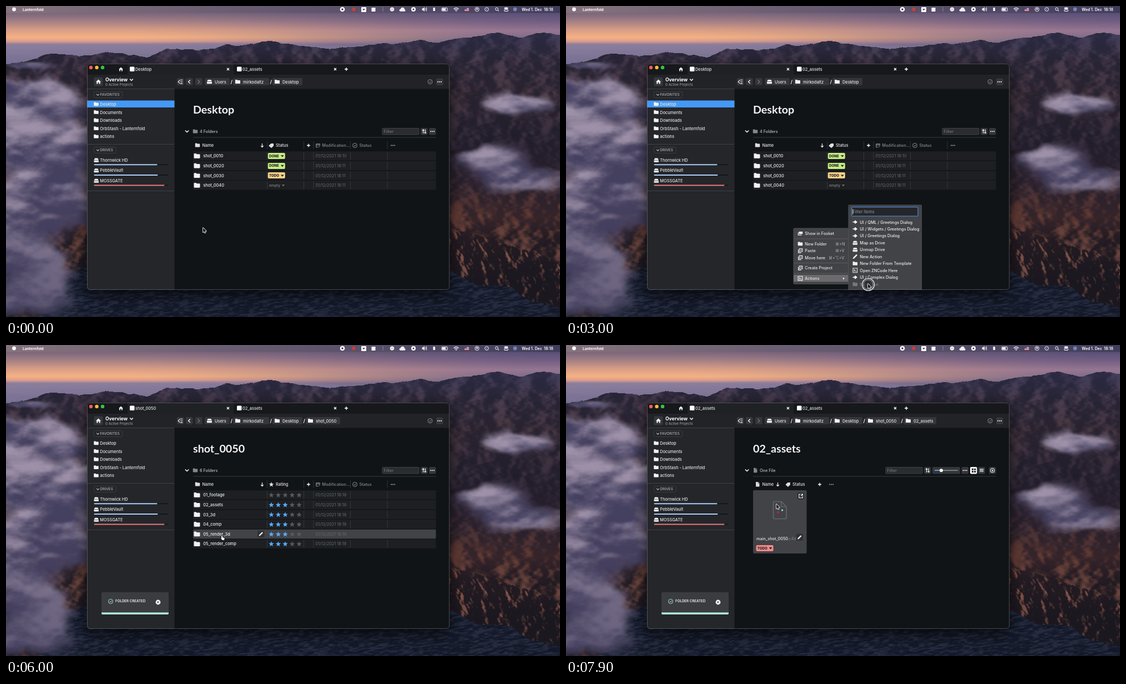
An HTML page with a canvas for the animation above (8 s loop, 998 by 561 pixels).

```html
<!DOCTYPE html>
<html lang="en">
<head>
<meta charset="utf-8">
<title>Folder template demo</title>
<style>
html, body { margin: 0; width: 100%; height: 100%; overflow: hidden; background: #1b1f33; }
canvas { display: block; }
</style>
</head>
<body>
<canvas id="stage" width="998" height="561"></canvas>
<script>
const W = 998, H = 561, LOOP = 8000;
const ctx = document.getElementById('stage').getContext('2d');
const clamp = (v, a = 0, b = 1) => Math.min(b, Math.max(a, v));
const smooth = (a, b, v) => { const t = clamp((v - a) / (b - a)); return t * t * (3 - 2 * t); };

// ---------- landscape ----------
function paintLandscape() {
  const canvas = document.createElement('canvas');
  canvas.width = W; canvas.height = H;
  const g = canvas.getContext('2d'), image = g.createImageData(W, H);
  let seed = 7;
  const lattice = Float32Array.from({ length: 65536 }, () => (seed = (seed * 16807) % 2147483647) / 2147483647);
  const at = (x, y) => lattice[(x & 255) + ((y & 255) << 8)];
  const noise = (x, y) => {
    const i = Math.floor(x), j = Math.floor(y), u = x - i, v = y - j;
    const s = u * u * (3 - 2 * u), r = v * v * (3 - 2 * v);
    const top = at(i, j) + (at(i + 1, j) - at(i, j)) * s;
    return top + (at(i, j + 1) + (at(i + 1, j + 1) - at(i, j + 1)) * s - top) * r;
  };
  const fbm = (x, y, octaves = 4) => {
    let sum = 0, amp = .5, total = 0;
    for (; octaves--; amp /= 2, x = x * 2 + 17, y = y * 2 + 31) { sum += amp * noise(x, y); total += amp; }
    return sum / total;
  };
  const rgb = h => [1, 3, 5].map(i => parseInt(h.slice(i, i + 2), 16));
  const mix = (a, b, t) => [a[0] + (b[0] - a[0]) * t, a[1] + (b[1] - a[1]) * t, a[2] + (b[2] - a[2]) * t];
  const ramp = (stops, v) => {
    let i = 1;
    while (i < stops.length - 1 && stops[i][0] < v) i++;
    const [a, ca] = stops[i - 1], [b, cb] = stops[i], t = clamp((v - a) / (b - a));
    return typeof ca === 'number' ? ca + (cb - ca) * t : mix(ca, cb, t);
  };
  const stops = list => list.map(([v, c]) => [v, rgb(c)]);

  const sky = stops([[10, '#75627a'], [26, '#a07d84'], [42, '#d69c85'], [56, '#f4b283'], [63, '#dc9d8c'], [69, '#8c7c9a'], [110, '#67648a']]);
  const coolSky = stops([[10, '#554d74'], [28, '#735f83'], [44, '#957591'], [60, '#776887'], [80, '#5a5579']]);
  const land = stops([[50, '#2b2a42'], [95, '#272435'], [150, '#292330'], [240, '#211d2b'], [330, '#29202c'], [380, '#35242a'], [420, '#231b22'], [500, '#1a171f']]);
  const litLand = stops([[50, '#484463'], [100, '#564456'], [150, '#55404a'], [280, '#392f40'], [370, '#6e4136'], [440, '#865548'], [540, '#563a38']]);
  const cloudDark = rgb('#454161'), cloudLight = rgb('#a396ae'), mist = rgb('#8a81a0');
  const seaDark = rgb('#121827'), seaLight = rgb('#292e43');

  const farRidge = [[0, 66], [180, 69], [300, 66], [480, 64], [600, 70], [998, 80]];
  const ridge = [[0, 106], [50, 96], [80, 86], [130, 88], [200, 84], [255, 92], [290, 78], [345, 80], [400, 70], [470, 64], [520, 70], [580, 77], [660, 72], [735, 62], [780, 65], [850, 53], [885, 47], [930, 55], [970, 49], [998, 53]];
  const coast = [[0, 585], [70, 555], [110, 490], [150, 460], [300, 475], [790, 475], [850, 503], [910, 505], [945, 533], [998, 545]];
  const cliffTop = [[790, 402], [850, 412], [920, 434], [998, 464]];
  // Cloud banks: x, y, radius x, radius y, strength
  const banks = [[20, 165, 150, 42, 1], [60, 245, 160, 80, 1.1], [30, 380, 150, 110, 1], [20, 510, 105, 75, .9], [925, 175, 80, 20, .9], [870, 275, 100, 32, .85], [930, 312, 110, 28, .9], [40, 106, 60, 9, .7]];

  for (let x = 0; x < W; x++) {
    const rough = (fbm(x / 22, 3) - .5) * 8;
    const far = ramp(farRidge, x), top = ramp(ridge, x) + rough, shore = ramp(coast, x) + rough;
    const cliff = x > 790 ? ramp(cliffTop, x) + rough : H;
    for (let y = 0; y < H; y++) {
      let c;
      if (y < top) {
        c = mix(ramp(sky, y), ramp(coolSky, y), smooth(200, 1000, x));
        if (y > far) c = mix(c, mist, fbm(x / 90, y / 5) * .6);
      } else if (y > shore) {
        c = mix(seaDark, seaLight, smooth(.3, .85, fbm(x / 9, (y + x * .12) / 2.5, 3)));
      } else {
        // Slopes catch light on the side facing the sunset.
        const steep = y > cliff, u = (x - y * .5) / (steep ? 15 : 34), v = (y + x * .25) / (steep ? 24 : 26);
        const slope = fbm(u + .22, v + .1) - fbm(u, v);
        const lit = steep ? smooth(.01, .2, slope) : smooth(-.1, .2, slope) * .75;
        c = mix(ramp(land, y), ramp(litLand, y), lit);
      }
      if (y > 70 && (x < 260 || x > 700)) {
        let density = 0;
        for (const [bx, by, rx, ry, s] of banks) {
          const d = ((x - bx) / rx) ** 2 + ((y - by) / ry) ** 2;
          if (d < 4) density += s * Math.exp(-d * 1.3);
        }
        if (density > .03) {
          const u = x / 75 + 9, v = y / 42, puff = fbm(u, v, 5);
          const cover = smooth(.22, .62, density * .75 + (puff - .5) * .9);
          const shade = fbm(x / 95, y / 38 + 40, 3) + (fbm(u + .05, v + .25, 5) - puff) * 1.1;
          const dim = 1 - .55 * smooth(310, 500, y);
          c = mix(c, mix(cloudDark, cloudLight, smooth(.2, .8, shade) * dim), cover * .95);
        }
      }
      const p = (y * W + x) * 4;
      image.data[p] = c[0]; image.data[p + 1] = c[1]; image.data[p + 2] = c[2]; image.data[p + 3] = 255;
    }
  }
  g.putImageData(image, 0, 0);
  return canvas;
}

// ---------- drawing helpers ----------
function text(s, x, y, { size = 7.4, color = '#e6e6e8', weight = 500, family = 'Inter' } = {}) {
  ctx.font = `${weight} ${size}px ${family}, "DejaVu Sans", sans-serif`;
  ctx.fillStyle = color;
  ctx.fillText(s, x, y + size * .36);
}
function rect(x, y, w, h, fill, r = 0, stroke) {
  ctx.beginPath();
  ctx.roundRect(x, y, w, h, r);
  if (fill) { ctx.fillStyle = fill; ctx.fill(); }
  if (stroke) { ctx.strokeStyle = stroke; ctx.lineWidth = 1; ctx.stroke(); }
}
function circle(x, y, r, fill, stroke, width = 1) {
  ctx.beginPath();
  ctx.arc(x, y, r, 0, 7);
  if (fill) { ctx.fillStyle = fill; ctx.fill(); }
  if (stroke) { ctx.strokeStyle = stroke; ctx.lineWidth = width; ctx.stroke(); }
}
// Icons live in a 10 by 10 box centred on the given point.
const star = 'M' + Array.from({ length: 10 }, (_, i) => {
  const r = i % 2 ? 2.3 : 5.2, a = i * Math.PI / 5;
  return `${5 + r * Math.sin(a)} ${5.2 - r * Math.cos(a)}`;
}).join('L') + 'Z';
const icons = Object.fromEntries(Object.entries({
  folder: 'M0 2q0-1 1-1h2.5l1.2 1.2H9q1 0 1 1V8q0 1-1 1H1Q0 9 0 8z',
  drive: 'M2 1h6l2 3.7H0zM0 5.5h10V8.5q0 .8-.8.8H.8Q0 9.3 0 8.5z',
  home: 'M0 5.2 5 .5l5 4.7H8.6v4.3H6.2V6.3H3.8v3.2H1.4V5.2z',
  file: 'M1.5 0H6v3h3v7H1.5zM6.7 0 9 2.3H6.7z',
  tag: 'M0 5 4.5 1H9.5V6L5.5 9.7Q4.7 10.3 4 9.5L0 6z',
  pencil: 'M0 10 .8 7 7 .8Q8 0 9.2 1.2T9.2 3L3 9.2z',
  action: 'M0 4h3L5 1l5 4-5 4-2-3H0z',
  window: 'M2 1h8v5H2zM0 3h1.2v4.5H8V9H0z',
  triangle: 'M0 2.5h10L5 8z',
  arrow: 'M2 1 8 5 2 9z',
  speaker: 'M0 3h2l3-2.5v9L2 7H0zM6.5 2.5h1v5h-1zM8.5 1h1v8h-1z',
  cloud: 'M2 8.5Q0 8.3 0 6.5T2 4.5Q3 1.5 6 2T8.2 5Q10 5 10 6.8T8 8.5z',
  star
}).map(([k, d]) => [k, new Path2D(d)]));
const strokes = Object.fromEntries(Object.entries({
  down: 'M1 3 5 7 9 3', left: 'M7 1 3 5 7 9', right: 'M3 1 7 5 3 9',
  cross: 'M1 1 9 9M9 1 1 9', plus: 'M5 0V10M0 5H10', downArrow: 'M5 0V9M1.5 6 5 9.5 8.5 6',
  collapse: 'M4 1 0 5 4 9M5 1H10M5 5H10M5 9H10', check: 'M2.8 5.2 4.5 7 7.4 3.4',
  sort: 'M3 9.5V1M.8 3 3 .8 5.2 3M7.5.5V9M5.3 7 7.5 9.2 9.7 7', calendar: 'M1 1.5H9V5M1 1.5V9H5M1 4H9M6 9 9.5 6',
  list: 'M0 2H10M0 5H10M0 8H10', prompt: 'M.5.5H9.5V9.5H.5ZM2.5 3 5 5 2.5 7M5.5 7H7.5',
  copy: 'M3 1H9.5V7H3ZM1 3V9.5H7M5 4H8', open: 'M4.5 1H1V9H9V5.5M6 .7H9.3V4M9 1 5 5',
  wifi: 'M0 4Q5-.8 10 4M2 6Q5 3 8 6M4 8Q5 7 6 8', gear: 'M5 0V10M0 5H10M1.5 1.5 8.5 8.5M8.5 1.5 1.5 8.5'
}).map(([k, d]) => [k, new Path2D(d)]));
function icon(name, x, y, size = 9, color = '#f2f2f3', width = 1.1) {
  const k = size / 10;
  ctx.save();
  ctx.translate(x - size / 2, y - size / 2);
  ctx.scale(k, k);
  if (icons[name]) { ctx.fillStyle = color; ctx.fill(icons[name]); }
  else { ctx.strokeStyle = color; ctx.lineWidth = width / k; ctx.stroke(strokes[name]); }
  ctx.restore();
}
const dots = (x, y, color = '#fff') => [-3, 0, 3].forEach(d => circle(x + d, y, 1, color));
function checkMark(x, y, color, r = 4) {
  circle(x, y, r, null, color, .9);
  icon('check', x, y, r * 2, color, 1);
}

// ---------- desktop and window frame ----------
const muted = '#77797d', grey = '#bdbec1', panel = '#35363a';

function menuBar() {
  const tint = ctx.createLinearGradient(0, 0, W, 0);
  tint.addColorStop(0, '#85737d');
  tint.addColorStop(.5, '#64586f');
  tint.addColorStop(1, '#403d5c');
  rect(0, 0, W, 12.5, tint);
  circle(14.5, 6, 3.4, '#fff');
  text('Lanternfold', 30, 6.3, { size: 6.7, weight: 700, color: '#fff' });
  circle(606, 6, 4.3, '#fff'); rect(604.5, 4.5, 3, 3, '#34324b');
  rect(624, 3, 5, 6, '#d63c2e');
  rect(640, 2, 9, 9, '#fff', 1); icon('triangle', 644.5, 6.5, 5, '#34324b');
  rect(658.5, 3, 7, 7, '#fff');
  rect(678.5, 2, 1, 8, '#8b88a0');
  circle(695.5, 6, 2.8, null, '#fff', 1.5); icon('gear', 695.5, 6, 8, '#fff', .8);
  icon('cloud', 714, 6, 11); circle(734, 6, 4, '#fff'); circle(734, 6, 1.5, '#34324b');
  icon('speaker', 754, 6, 9); rect(769.5, 3, 3.5, 6, '#fff');
  rect(785, 3.5, 10, 5.5, null, 1, '#fff'); rect(786, 4.5, 6, 3.5, '#fff');
  icon('wifi', 811, 6.5, 9, '#fff', 1.3);
  for (let i = 0; i < 5; i++) rect(826, 3 + i * 1.3, 8, 1.3, i % 2 ? '#eee' : '#c54b52');
  rect(826, 3, 4, 3.3, '#45558e');
  circle(848.5, 6, 3.6, null, '#fff'); circle(848.5, 5.5, 1.4, '#fff');
  circle(866, 6, 3.4, null, '#fff', .9); icon('left', 866, 6, 3, '#fff', .8);
  circle(884, 5.5, 2.5, null, '#fff'); icon('right', 887, 8.5, 2, '#fff');
  rect(897.5, 2.5, 7, 3, '#fff', 1.5); rect(897.5, 6.5, 7, 3, null, 1.5, '#fff');
  circle(917, 6, 3.4, '#7484b5');
  text('Wed 1. Dec', 929, 6.3, { size: 6.9, color: '#fff', weight: 600 });
  text('18:18', 969, 6.3, { size: 6.9, color: '#fff', weight: 600 });
}

function windowShell() {
  ctx.save();
  ctx.shadowColor = 'rgba(0,0,0,.75)'; ctx.shadowBlur = 26; ctx.shadowOffsetY = 8;
  rect(146, 104, 653, 408, '#111417', 5);
  ctx.restore();
  rect(146, 104, 653, 20, '#17181b', [5, 5, 0, 0]);
  rect(219, 104, 191, 20, '#202125');
  rect(146, 124, 653, 25.5, '#222327');
  rect(146, 149, 157.5, 363, '#25262a', [0, 0, 0, 5]);
  ['#f25f57', '#f8bd35', '#30c748'].forEach((c, i) => circle(153 + i * 10.5, 111, 3.2, c));
}

function tabsAndPath(place, crumbs) {
  icon('home', 207, 114, 8);
  [[223, place], [416, '02_assets']].forEach(([x, s]) => {
    rect(x, 109.5, 8.5, 8.5, '#fff', 1.5);
    text(s, x + 10, 114, { size: 7.4 });
  });
  icon('cross', 400, 114, 5, '#fff', 1.3); icon('cross', 593, 114, 5, '#fff', 1.3);
  icon('plus', 613, 114, 6, '#fff', 1.4);
  [308, 324, 341].forEach(x => rect(x, 130, 12.5, 13, panel, 2));
  icon('collapse', 314.2, 136.7, 8, '#fff', 1.1);
  icon('left', 330.2, 136.7, 8, '#fff', 1.3);
  icon('right', 347.2, 136.7, 8, '#77797c', 1.2);
  const chips = [['Users', 358, 45], ['mirkodaltz', 409, 65], ['Desktop', 480, 54], ['shot_0050', 540, 62], ['02_assets', 608, 59]];
  chips.slice(0, crumbs).forEach(([s, x, w], i) => {
    if (i) text('/', x - 4.5, 136.8, { size: 9, weight: 700 });
    rect(x, 130, w, 13, panel, 2);
    icon(i ? 'folder' : 'drive', x + 8.5, 136.5, 9);
    text(s, x + 18, 137, { size: 7.4 });
  });
  checkMark(764, 136.7, '#96979a');
  rect(775, 130.5, 12.5, 12.5, panel, 2); dots(781, 136.7);
}

function sidebar(desktopActive) {
  rect(158.5, 128.5, 16, 16, '#36373b', 2); icon('home', 166.5, 136.5, 9);
  text('Overview', 179, 133, { size: 8.6, weight: 700, color: '#fff' });
  icon('down', 226, 133, 7, '#fff', 1.4);
  text('0 Active Projects', 179, 142.2, { size: 6.2, color: '#aaabaf', weight: 400 });
  [149, 249, 333].forEach(y => rect(146, y, 157, 1, '#404146'));
  [['FAVORITES', 160, 51], ['DRIVES', 260, 40]].forEach(([s, y, w]) => {
    rect(158.5, y - 5.5, w, 11, null, 2, '#3b3c41');
    icon('down', 165.5, y, 6, grey);
    text(s, 169.5, y, { size: 6.5, color: '#aeb0b3' });
  });
  if (desktopActive) rect(146, 170.5, 157.5, 12.5, '#4499f8');
  ['Desktop', 'Documents', 'Downloads', 'OrbStash - Lanternfold', 'actions'].forEach((s, i) => {
    const y = 177.3 + i * 14.6;
    icon('folder', 162.5, y - .5, 8.5);
    text(s, 169.3, y, { size: 7.4 });
  });
  [['Thornwick HD', 272.5, '#a9cff9'], ['PebbleVault', 273.5, '#a9cff9'], ['MOSSGATE', 285.5, '#ef7d80']].forEach(([s, end, c], i) => {
    const y = 278 + i * 18.6;
    icon('drive', 162.7, y, 8.5);
    text(s, 169.3, y, { size: 7.4 });
    rect(158.5, y + 7.3, 133, 2, '#15161a', 1);
    rect(158.5, y + 7.3, end - 158.5, 2, c, 1);
  });
}

// ---------- folder views ----------
function heading(title, count, kind, filterX) {
  text(title, 337, 187, { size: 19.7, weight: 700, color: '#f4f4f5', family: 'Lato' });
  icon('down', 326, 226, 8, '#fff', 1.4);
  icon(kind, 341, 226, 8.5, '#85878a');
  text(count, 349, 226.3, { size: 7.3, color: grey });
  rect(filterX + .5, 220.5, 66, 11.5, '#2a2c30', 1, '#3f4145');
  text('Filter', filterX + 3, 226.3, { size: 7.3, color: '#74767a' });
  rect(337, 236.5, 438, 1, '#393b3e');
}
const button = (x, y = 220, color = panel) => rect(x, y, 12.5, 12.5, color, 2);

function tag(label, x, y, color) {
  rect(x, Math.round(y - 5.5), 31, 11, color, 2);
  text(label, x + 2.2, y, { size: 6.2, weight: 800, color: '#20211f' });
  icon('triangle', x + 26, y + .3, 6, '#20211f');
}

function folderTable(names, rated, hovered, pencilRow) {
  button(747); icon('sort', 753.2, 226.2, 8, '#fff');
  button(762); dots(768.2, 226.2);
  icon('folder', 345, 251, 8.5, '#dededf');
  text('Name', 353.5, 251.5, { size: 7.4 });
  icon('downArrow', 461.5, 251.5, 7, '#fff');
  icon(rated ? 'star' : 'tag', 478, 251.5, 9, '#dededf');
  text(rated ? 'Rating' : 'Status', 486, 251.5, { size: 7.4 });
  icon('plus', 545, 251.5, 6, '#fff', 1.3);
  icon('calendar', 562, 251.5, 8, '#9a9c9f', 1);
  text('Modification...', 569.3, 251.5, { size: 7.3, color: '#888a8e' });
  checkMark(628.5, 251.5, '#9a9c9f');
  text('Status', 636.5, 251.5, { size: 7.3, color: '#888a8e' });
  dots(697, 251.5, '#a8a9ac');

  const columns = [470, 536, 553.5, 620, 686.5];
  columns.forEach(x => rect(x, 244, 1, 14, '#303236'));
  names.forEach((name, i) => {
    const y = 270.4 + i * 17.64, hot = i === hovered;
    rect(337, y - 8.2, 437.5, 16.4, hot ? '#424346' : '#1d1f22', hot ? 2 : 0);
    if (!hot) columns.forEach(x => rect(x, y - 7, 1, 14, '#35373a'));
    icon('folder', 344, y, 11);
    text(name, 355.3, y + .2, { size: 7.4, color: '#f0f0f1' });
    if (i === pencilRow) { rect(453, y - 6, 12.5, 12, '#303135', 2); icon('pencil', 459.3, y, 7.5); }
    if (rated) {
      for (let s = 0; s < 5; s++) icon('star', 478 + s * 12.5, y + .3, 9.5, i && s < 3 ? '#55a9f8' : '#57595e');
    } else if (i < 3) {
      tag(i < 2 ? 'DONE' : 'TODO', 471.8, y, i < 2 ? '#c6ee83' : '#fcd18a');
    } else {
      text('empty', 474, y, { size: 6.5, weight: 600, color: '#77797d' });
      icon('triangle', 499.5, y + .2, 5.5, muted);
    }
    const minute = rated || i === 4 ? '18' : i ? '11' : '10';
    text(`01/12/2021 18:${minute}`, 557.5, y + .2, { size: 7.3, color: hot ? '#66686c' : '#696b70', weight: 400 });
  });
}

function fileGrid() {
  button(645); icon('sort', 651.2, 226.2, 8, '#fff');
  rect(660, 220, 50, 12.5, panel, 2);
  rect(664, 225.5, 42, 1.5, '#8e9094'); rect(664, 225.5, 12, 1.5, '#55a9f8');
  circle(676, 226.2, 3, '#fff');
  button(712.5); dots(718.7, 226.2);
  button(728, 220, '#f5f5f6');
  [731, 735.2].forEach(x => [222.8, 227].forEach(y => rect(x, y, 3, 3, '#222')));
  button(742.5); icon('list', 748.7, 226.2, 7, '#fff');
  button(762); circle(768.2, 226.2, 3.8, null, '#fff'); icon('downArrow', 768.2, 226, 3.5, '#fff');
  icon('file', 345, 251.3, 8.5, '#dededf'); text('Name', 353.5, 251.5);
  icon('downArrow', 381.5, 251.5, 7, '#fff');
  icon('tag', 400, 251.5, 8.5, '#dededf'); text('Status', 408, 251.5);
  icon('plus', 457, 251.5, 6, '#fff', 1.3); dots(478, 251.5, '#a8a9ac');

  rect(337, 262, 96.5, 114, '#424346', 2);
  ctx.strokeStyle = '#626467'; ctx.lineWidth = 1.7;
  ctx.stroke(new Path2D('M375.5 282.5H388L397 291.5V311Q397 313.5 394.5 313.5H376Q373.5 313.5 373.5 311V284.5Q373.5 282.5 375.5 282.5M388 282.5V291.5H397'));
  circle(382, 302, 2.2, '#a92655'); circle(389.5, 298, 1.7, '#76ead1');
  rect(417, 266.5, 12, 12, '#2a2b2f', 2); icon('open', 423, 272.5, 8, '#fff');
  text('main_shot_0050', 343, 349, { size: 7.3 });
  text('.c4d', 399, 349, { size: 7.3, color: '#77797d' });
  rect(414.5, 340.5, 12.5, 12.5, '#303135', 2); icon('pencil', 420.8, 346.8, 7.5);
  tag('TODO', 342.5, 366.3, '#f38a8a');
}

// ---------- menus, toast, pointer ----------
function contextMenu(pointer, submenu) {
  rect(410, 401, 98.5, 100.5, '#424346', 1, '#4d4e51');
  [419.5, 463, 481.7].forEach(y => rect(411, y, 97, 1, '#5b5c5f'));
  const items = [['Show in Fosket', 410.3, 'window'], ['New Folder', 428.8, 'folder', '⌘+N', 485], ['Paste', 441.3, 'copy', '⌘+V', 485],
    ['Move here', 453.8, 'copy', '⌘+⌥+V', 473], ['Create Project', 472.5, 'copy'], ['Actions', 491.3, 'prompt']];
  items.forEach(([label, y, symbol, keys, keyX]) => {
    const inside = pointer.x > 411 && pointer.x < 509 && Math.abs(pointer.y - y) < 6.2;
    const hot = submenu ? label === 'Actions' : inside;
    if (hot) rect(410, y - 6.2, 98.5, 12.4, '#6b6b6d');
    icon(symbol, 422, y, 8.5);
    text(label, 430.3, y + .2, { size: 7.3 });
    if (keys) text(keys, keyX, y + .2, { size: 7.2, color: hot ? '#858587' : '#a4a5a8' });
  });
  icon('arrow', 500.5, 491.5, 5);
}

function actionMenu(pointer) {
  ctx.save();
  ctx.beginPath(); ctx.rect(146, 104, 653, 408); ctx.clip();
  rect(509, 359, 131.5, 160, '#424346', 1, '#4d4e51');
  rect(514.5, 362.8, 119.5, 16.2, '#25262a', 1, '#4c97f3');
  rect(516.3, 366, .8, 10, '#fff');
  text('Filter Items', 516.5, 371.2, { size: 7.4, color: '#88898d' });
  [['UI / QML / Greetings Dialog', 'action'], ['UI / Widgets / Greetings Dialog', 'action'], ['UI / Greetings Dialog', 'action'],
    ['Map as Drive', 'drive'], ['Unmap Drive', 'drive'], ['New Action', 'pencil'], ['New Folder From Template', 'folder'],
    ['Open ZNCode Here', 'prompt'], ['UI / Complex Dialog', 'action'], ['New Shot', 'folder']].forEach(([s, symbol], i) => {
    const y = 389.7 + i * 12.45, hot = pointer.x > 509 && Math.abs(pointer.y - y) < 6.2;
    const color = hot ? '#77787b' : '#ededee';
    icon(symbol, 520.8, y, 8.5, color);
    text(s, 529.3, y + .2, { size: 7.3, color });
  });
  ctx.restore();
}

function toast(alpha) {
  ctx.save();
  ctx.globalAlpha = Math.min(1, alpha * 2);
  rect(172, 446, 121, 40, '#3b3c40', 2);
  ctx.globalAlpha = alpha;
  rect(172, 482.5, 121, 3.5, '#b0f3da', [0, 0, 2, 2]);
  checkMark(188.5, 462.5, '#b0f3da');
  text('FOLDER CREATED', 197, 462.2, { size: 6.2, weight: 600, color: '#f2f2f3' });
  circle(274, 464, 4.4, '#f2f2f3'); icon('cross', 274, 464, 3.6, '#3b3c40', 1.2);
  ctx.restore();
}

// Time, x, y of the pointer
const route = [[0, 355, 400], [700, 410, 401], [1800, 410, 401], [1900, 427, 440], [2400, 455, 491], [2600, 460, 491],
  [2900, 544, 501], [4000, 544, 501], [4400, 465, 450], [4900, 388, 344], [6300, 388, 344], [6600, 387, 325], [6800, 379, 287], [8000, 379, 287]];
function pointerAt(t) {
  const i = route.findIndex(k => k[0] > t), [ta, xa, ya] = route[i - 1], [tb, xb, yb] = route[i];
  const k = smooth(ta, tb, t);
  return { x: xa + (xb - xa) * k, y: ya + (yb - ya) * k };
}
const arrowShape = new Path2D('M0 0V8.2L1.9 6.5 3.2 9.3 4.5 8.7 3.3 6H5.8Z');
const handShape = new Path2D('M1 0Q2 0 2 1V3L5 3.8Q5.8 4.2 5.5 5.4L5 8H1.8L-.6 5.2Q-.8 4.3 .1 4.6V1Q.1 0 1 0Z');
const clicks = [[1100, 1300], [2900, 3200], [5600, 5800], [6900, 7200]];

function drawPointer({ x, y }, t, hand) {
  if (clicks.some(([a, b]) => t >= a && t < b)) {
    circle(x + .5, y + 1.5, 11, 'rgba(30,31,34,.55)', '#f3f3f4', 1.2);
    circle(x + .5, y + 1.5, 8.7, null, '#b5b6b9', 1);
  }
  ctx.save();
  ctx.translate(x, y);
  ctx.lineWidth = 1.6; ctx.lineJoin = 'round';
  ctx.strokeStyle = hand ? '#18191b' : '#fff'; ctx.stroke(hand ? handShape : arrowShape);
  ctx.fillStyle = hand ? '#fff' : '#151618'; ctx.fill(hand ? handShape : arrowShape);
  ctx.restore();
}

// ---------- timeline ----------
const shots = ['shot_0010', 'shot_0020', 'shot_0030', 'shot_0040', 'shot_0050'];
const shotFolders = ['01_footage', '02_assets', '03_3d', '04_comp', '05_render_3d', '05_render_comp'];
const backdrop = document.createElement('canvas').getContext('2d');

function prepare() {
  backdrop.canvas.width = W; backdrop.canvas.height = H;
  ctx.drawImage(paintLandscape(), 0, 0);
  menuBar();
  windowShell();
  backdrop.drawImage(ctx.canvas, 0, 0);
}

function render(t) {
  const pointer = pointerAt(t), inShot = t >= 6000, inAssets = t >= 7500;
  ctx.drawImage(backdrop.canvas, 0, 0);
  const place = inAssets ? '02_assets' : inShot ? 'shot_0050' : 'Desktop';
  tabsAndPath(place, inAssets ? 5 : inShot ? 4 : 3);
  sidebar(!inShot);

  const names = inShot ? shotFolders : shots.slice(0, t < 3400 ? 4 : 5);
  const row = Math.round((pointer.y - 270.4) / 17.64);
  const overRow = !inAssets && row >= 0 && row < names.length;
  if (inAssets) {
    heading(place, 'One File', 'file', 575.5);
    fileGrid();
  } else {
    heading(place, `${names.length} Folders`, 'folder', 677.5);
    // The row highlight trails the pointer slightly.
    const hovered = !overRow ? -1 : inShot && t < 6700 ? 4 : row;
    folderTable(names, inShot, hovered, overRow ? row : -1);
  }
  if (t >= 4100) toast(smooth(3950, 4750, t));
  if (t >= 1100 && t < 3200) {
    contextMenu(pointer, t >= 2500);
    if (t >= 2500) actionMenu(pointer);
  }
  rect(146.5, 104.5, 652, 407, null, 5, 'rgba(150,150,160,.4)');
  drawPointer(pointer, t, overRow);
}

prepare();
let start;
function frame(now) {
  start ??= now;
  render(Math.floor((now - start) % LOOP / 100) * 100);
  requestAnimationFrame(frame);
}
render(0);
requestAnimationFrame(frame);
</script>
</body>
</html>
```
